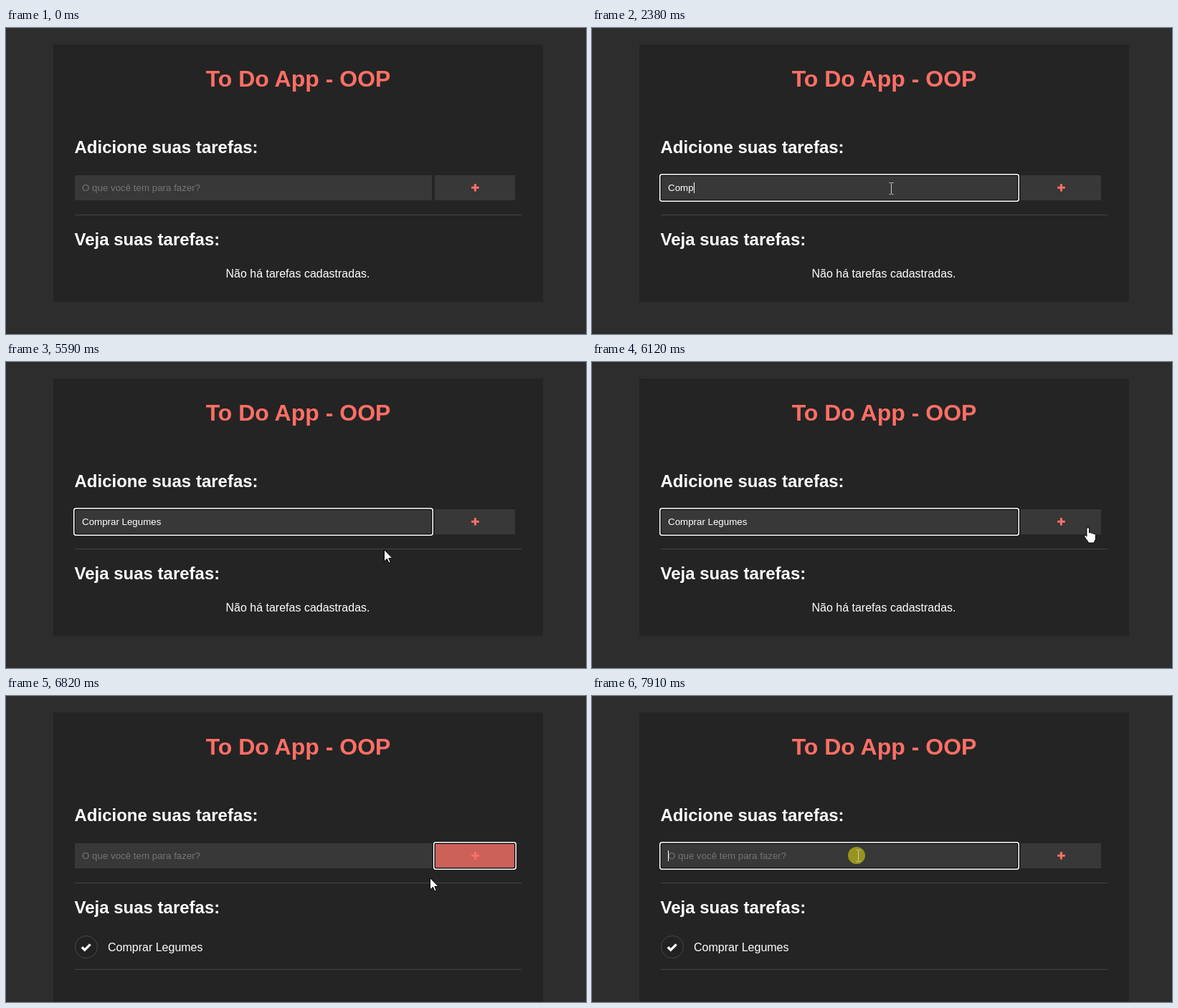
Animation, 809 px wide and 428 px high, one loop 7.99 s. Source, as an HTML page:

```html
<!DOCTYPE html>
<html lang="pt-BR">
<head>
<meta charset="utf-8">
<title>To Do App - OOP</title>
<style>
  html, body { margin: 0; width: 100%; height: 100%; overflow: hidden; background: #2d2d2d; }
  svg { display: block; width: 809px; height: 428px; }
  text { font: 16px "Liberation Sans", Arial, sans-serif; fill: #fff; white-space: pre; }
  .title { font-size: 32px; font-weight: bold; fill: #ff6f66; text-anchor: middle; }
  .head { font-size: 24px; font-weight: bold; }
  .field { font-size: 13.333px; }
  .hint { fill: #757575; }
  .line { fill: #444; }
  .ring { fill: none; stroke: #fff; stroke-width: 1.5; }
  .inner { fill: none; stroke: #101010; stroke-width: 1.5; }
  .arrow, .hand { fill: #fff; stroke: #000; stroke-width: 1; stroke-linejoin: round; }
  .beam { fill: none; stroke: #c8c8c8; }
</style>
</head>
<body>
<svg viewBox="0 0 809 428">
  <rect width="809" height="428" fill="#2d2d2d"/>
  <rect id="panel" x="66" y="23" width="683" height="360" fill="#242424"/>
  <text class="title" x="407.5" y="82">To Do App - OOP</text>
  <text class="head" x="95.5" y="175">Adicione suas tarefas:</text>

  <rect x="96" y="206" width="498" height="35" fill="#383838"/>
  <text id="hint" class="field hint" x="106" y="228">O que você tem para fazer?</text>
  <text id="typed" class="field" x="106" y="228"></text>
  <rect id="caret" y="216" width="1" height="15" fill="#fff"/>
  <g id="fieldRing">
    <rect class="inner" x="96.25" y="206.25" width="497.5" height="34.5" rx="1.5"/>
    <rect class="ring" x="94.75" y="204.75" width="500.5" height="37.5" rx="3"/>
  </g>

  <rect id="button" x="598" y="206" width="112" height="35"/>
  <path id="plus" d="M654.5 218v10.6M649.2 223.3h10.6" stroke-width="3"/>
  <rect id="pressRing" class="ring" x="597.5" y="205.5" width="113" height="36" rx="2" style="stroke-width:3"/>
  <g id="buttonRing">
    <rect class="inner" x="598.25" y="206.25" width="111.5" height="34.5" rx="1.5"/>
    <rect class="ring" x="596.75" y="204.75" width="114.5" height="37.5" rx="3"/>
  </g>

  <rect class="line" x="96" y="261" width="623" height="1"/>
  <text class="head" x="95.5" y="304">Veja suas tarefas:</text>
  <text id="empty" x="407" y="349" text-anchor="middle">Não há tarefas cadastradas.</text>
  <g id="task">
    <circle cx="112" cy="351" r="15.5" fill="#222" stroke="#484848"/>
    <path d="M105.8 351.2l4 4 7.8-7.8" fill="none" stroke="#fff" stroke-width="3.4"/>
    <text x="142" y="357">Comprar Legumes</text>
    <rect class="line" x="96" y="382" width="623" height="1"/>
  </g>

  <circle id="spot" r="12" fill="rgb(248,240,0)" fill-opacity=".5"/>
  <g id="pointer">
    <path id="arrow" class="arrow" d="M.5.5V17l3.9-3.7 2.5 5.7 2.4-1-2.5-5.6h5.2z"/>
    <path id="hand" class="hand" transform="translate(1 1)" d="M-2 13V2.5a1.8 1.8 0 0 1 3.6 0V8c1-.8 3-.6 3.3.7 1-.6 2.7-.3 3 .9 1.2-.5 2.6.2 2.6 1.8v4.2c0 3-2.2 4.2-2.2 6.4h-8c0-2.4-3-4.5-5.3-8.6-.8-1.6 1.2-2.8 2.3-1.6z"/>
    <path id="beam" class="beam" d="M2.5-6V7M-.5-7.5h2.3l.7 1 .7-1h2.3M-.5 8.5h2.3l.7-1 .7 1h2.3"/>
  </g>
</svg>
<script>
const LOOP = 7990;
const TASK = "Comprar Legumes";
const el = id => document.getElementById(id);
const show = (id, on) => { el(id).style.display = on ? "" : "none"; };
const within = (t, a, b) => t >= a && t < b;

// Moments at which one more letter stands in the field; repeated where two arrive together.
const KEYS = [1900, 1980, 2210, 2380, 2450, 2700, 3000, 3150, 3870, 4020, 4250, 4480, 4860, 4860, 5110];
const CARET = [[740, 1280], [1830, 3700], [3870, 5590], [6130, 6280], [7910, LOOP]];
const CLICKS = [[740, 820], [6280, 6360], [7910, LOOP]];
const SUBMIT = 6440;
const HOVER = [6135, 6765], FADE = 300;

// Pointer runs: start, time per step, then places as [x, y, shape].
const RUNS = [
  [110, 80, [[644, 366], [625, 355], [576, 325], [513, 285], [456, 249], [425, 229, "beam"], [415, 224, "beam"]]],
  [5590, 77, [[527, 262], [610, 293], [690, 313], [737, 317], [742, 300], [725, 268], [704, 243],
    [691, 230, "hand"], [686, 225, "hand"], [685, 224, "hand"], [685, 224, "hand"]]],
  [6440, 77, [[685, 224, "hand"], [683, 224, "hand"], [674, 226, "hand"], [655, 231, "hand"], [626, 239, "hand"],
    [591, 254], [560, 271], [530, 288], [508, 301], [490, 309], [475, 312]]],
  [7280, 77, [[455, 300], [415, 270], [380, 246]]],
  [7660, 83.4, [[375, 242], [371, 230, "beam"], [369, 224, "beam"], [369, 223, "beam"]]]
];
const STEPS = RUNS.flatMap(([start, gap, places]) =>
  places.map(([x, y, shape = "arrow"], i) =>
    ({ t: start + Math.floor(i * gap / 10) * 10, x, y, shape })));

// The CSS "ease" curve.
function ease(p) {
  if (p <= 0 || p >= 1) return Math.min(1, Math.max(0, p));
  const bez = (u, a, b) => 3 * a * u * (1 - u) ** 2 + 3 * b * u * u * (1 - u) + u ** 3;
  let lo = 0, hi = 1;
  for (let i = 0; i < 16; i++) {
    const mid = (lo + hi) / 2;
    if (bez(mid, .25, .25) < p) lo = mid; else hi = mid;
  }
  return bez(lo, .1, 1);
}

function mix(a, b, k) {
  return `rgb(${a.map((v, i) => Math.round(v + (b[i] - v) * k))})`;
}

function drawPointer(step, t) {
  show("pointer", step);
  const click = step && CLICKS.some(([a, b]) => within(t, a, b));
  show("spot", click);
  if (!step) return;
  const place = `translate(${step.x} ${step.y})`;
  el("pointer").setAttribute("transform", place);
  el("spot").setAttribute("transform", place);
  for (const shape of ["arrow", "hand", "beam"]) show(shape, shape === step.shape);
}

function drawField(t) {
  const count = t < SUBMIT ? KEYS.filter(k => k <= t).length : 0;
  const typed = el("typed");
  typed.textContent = TASK.slice(0, count);
  show("hint", !count);
  show("fieldRing", within(t, 740, 6280) || t >= 7910);
  show("caret", CARET.some(([a, b]) => within(t, a, b)));
  el("caret").setAttribute("x", Math.round(106 + (count ? typed.getComputedTextLength() : 0)));
}

function drawButton(t, stepTime) {
  const k = ease((stepTime - HOVER[0]) / FADE) - ease((stepTime - HOVER[1]) / FADE);
  el("button").setAttribute("fill", mix([56, 56, 56], [255, 111, 102], k));
  el("plus").setAttribute("stroke", within(stepTime, ...HOVER) ? "#242424" : "#ff6f66");
  show("pressRing", within(t, 6280, SUBMIT));
  show("buttonRing", within(t, SUBMIT, 7910));
}

function draw(t) {
  const step = STEPS.filter(s => s.t <= t).pop();
  const added = t >= SUBMIT;
  el("panel").setAttribute("height", added ? 405 : 360);
  show("empty", !added);
  show("task", added);
  drawField(t);
  drawButton(t, step ? step.t : 0);
  drawPointer(step, t);
}

const begin = performance.now();
function tick() {
  draw((performance.now() - begin) % LOOP);
  requestAnimationFrame(tick);
}
tick();
</script>
</body>
</html>
```
